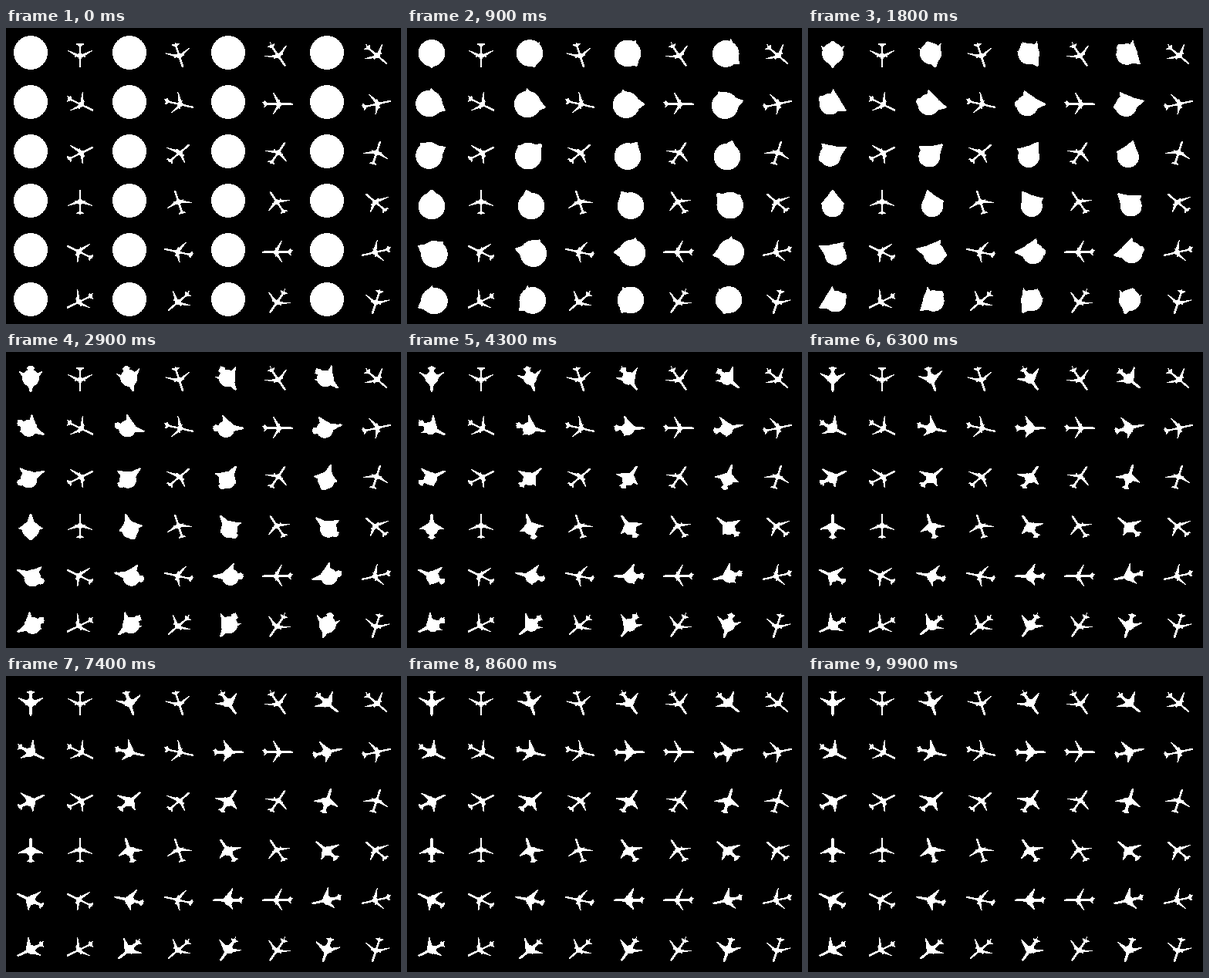
Recreate the animation shown at these times as an HTML page with a canvas. Size 512 by 384 pixels, loop 10000 ms.

```html
<!DOCTYPE html>
<html lang="en">
<head>
<meta charset="utf-8">
<title>Sphere to plane</title>
<style>
html, body { margin: 0; width: 100%; height: 100%; overflow: hidden; background: #000; }
canvas { display: block; }
</style>
</head>
<body>
<canvas id="stage" width="512" height="384"></canvas>
<script>
const ctx = document.getElementById('stage').getContext('2d', { willReadFrequently: true });
const W = 512, H = 384, STEP = 100, STEPS = 100;
const TILT = 0.84, LIFT = 0.54; // camera looking down at the ground
const DROP = 2.8;

const mix = (a, b, t) => a + (b - a) * t;
const mixPoint = (a, b, t) => [mix(a[0], b[0], t), mix(a[1], b[1], t)];

// Returns a projector: side, forward, up -> screen
function view(cx, cy, angle) {
  const s = Math.sin(angle), c = Math.cos(angle);
  return (x, y, z = 0) => [
    cx + x * c + y * s,
    cy + DROP + (y * c - x * s) * TILT - z * LIFT
  ];
}

function poly(project, points) {
  ctx.beginPath();
  for (const p of points) ctx.lineTo(...project(...p));
  ctx.closePath();
  ctx.fill();
}

function disc(x, y, r) {
  ctx.beginPath();
  ctx.arc(x, y, r, 0, Math.PI * 2);
  ctx.fill();
}

// Closes a half outline, running nose to tail, with its reflection
function mirrored(half) {
  return half.concat(half.map(([x, y, z]) => [-x, y, z]).reverse());
}

// Leading and trailing corner of a wing tip; soft wings are shorter and raised
function wingTip(fat) {
  const x = 16.5 - 3 * fat, y = -5 - 4 * fat, z = 2 + 14 * fat;
  return [[x, y, z], [x, y - 1.2, z]];
}

function plane(project, tip, girth) {
  poly(project, mirrored([
    [0.7, 20], [girth, 18], [girth, -13], [0.9, -18]
  ]));
  poly(project, mirrored([
    [1, 6], [3, 3.8], ...tip, [3, -1.2], [1, -2]
  ]));
  poly(project, mirrored([
    [0.8, -13], [5, -16], [5, -17.6], [0.8, -17]
  ]));
  poly(project, [[0, -13, 1], [0, -17.5, 5.5], [0, -20, 5.5], [0, -18, 0]]);
  for (const x of [-6, 6]) disc(...project(x, 2.5), 1.1);
}

function morph(cx, cy, angle, k) {
  const fat = Math.exp(-k / 29);
  const settle = 1 - Math.exp(-k / 8);
  const shift = fat * settle;
  const project = view(cx, cy, angle);
  const tip = wingTip(fat);

  plane(project, tip, 1.6);
  poly(project, mirrored([
    [1, 20],
    mixPoint([2, 6], [11, 8], Math.min(1, fat * fat * 2.5)),
    ...tip,
    mixPoint([2, -2], [12, -13], Math.min(1, fat * 1.2)),
    [1.6, -16]
  ]));
  disc(...project(0, -15.5), 2.4 + 5 * shift);

  // The ball sags and lags towards the tail as it shrinks
  const [bx, by] = project(0, -8 * shift, -7 * shift);
  disc(bx, by - DROP * (1 - settle), 4.5 + 17.5 * fat);
}

// Hard black and white edges
function threshold() {
  const image = ctx.getImageData(0, 0, W, H), d = image.data;
  for (let i = 0; i < d.length; i += 4) {
    d[i] = d[i + 1] = d[i + 2] = d[i] > 127 ? 255 : 0;
  }
  ctx.putImageData(image, 0, 0);
}

function draw(k) {
  ctx.fillStyle = '#000';
  ctx.fillRect(0, 0, W, H);
  ctx.fillStyle = '#fff';
  for (let i = 0; i < 24; i++) {
    const x = 32 + (i % 4) * 128;
    const y = 32 + Math.floor(i / 4) * 64;
    const angle = i * Math.PI / 12;
    morph(x, y, angle, k);
    const project = view(x + 64, y, angle);
    plane(project, wingTip(0), 1.4);
    disc(...project(0, 1), 3);
  }
  threshold();
}

let shown = 0;
const start = performance.now();

function tick() {
  const k = Math.floor((performance.now() - start) / STEP) % STEPS;
  if (k !== shown) draw(shown = k);
  requestAnimationFrame(tick);
}

draw(0);
requestAnimationFrame(tick);
</script>
</body>
</html>
```
